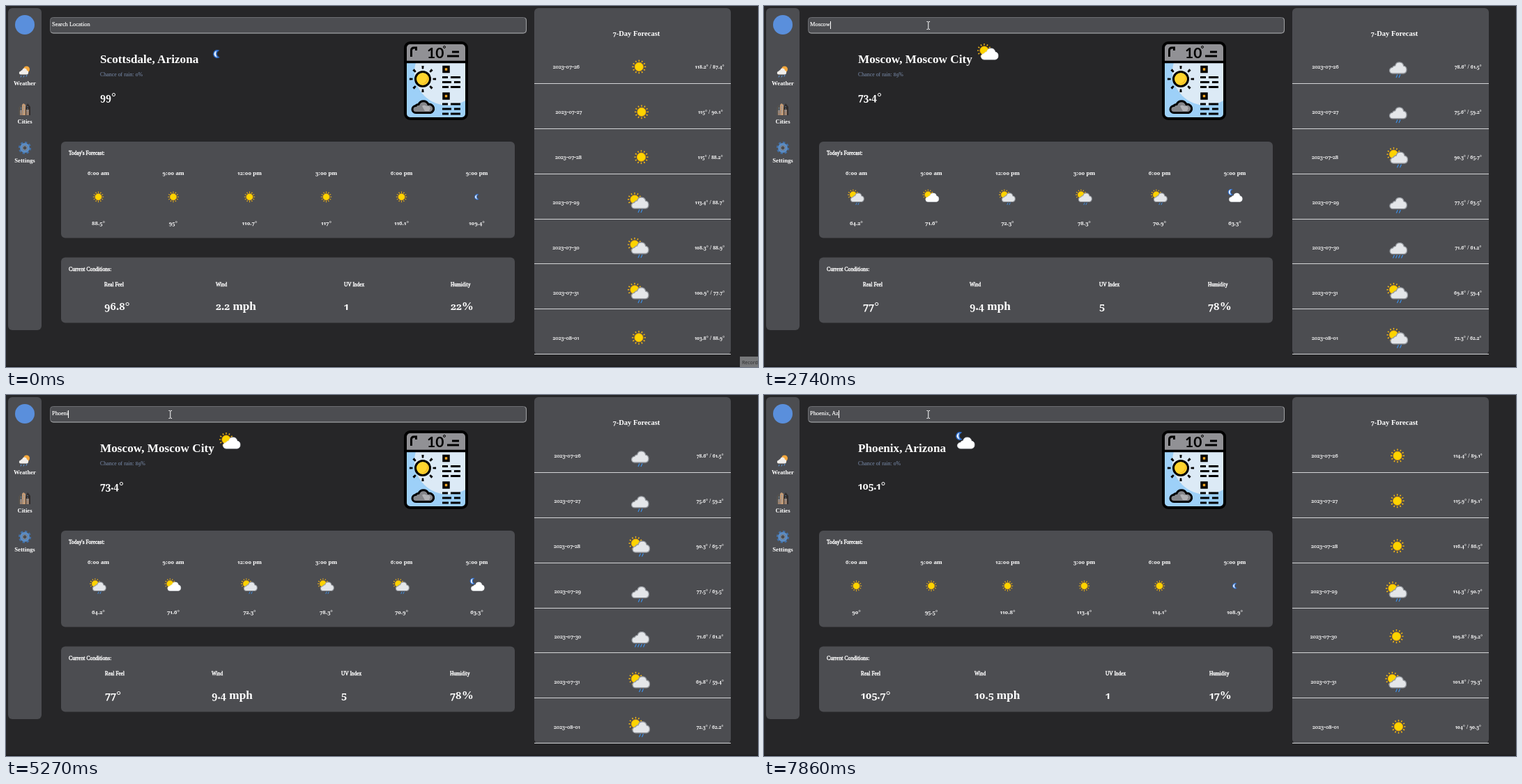
An HTML page that plays this animation: 1079 by 519 pixels, repeating every 8000 ms.

```html
<!DOCTYPE html>
<html lang="en">
<head>
<meta charset="utf-8">
<title>Weather dashboard</title>
<style>
html, body { margin: 0; width: 100%; height: 100%; overflow: hidden; background: #262628; }
svg { position: absolute; left: 0; top: 0; }
svg, #field { font-family: "Liberation Serif", "Noto Serif", serif; fill: #fff; color: #fff; }
.d { font-family: "Noto Serif", "Liberation Serif", serif; font-size: .86em; font-feature-settings: "onum", "pnum"; }
.l { stroke: #fff; stroke-width: .15px; }
.m { stroke: #fff; stroke-width: .4px; }
.b { font-weight: bold; }
.c { text-anchor: middle; }
#field { position: absolute; left: 66px; top: 20px; height: 14px; font-size: 8.4px; line-height: 14px; white-space: pre; -webkit-text-stroke: .15px #fff; }
#caret { position: absolute; top: 2px; width: 1px; height: 11px; background: #fff; }
</style>
</head>
<body>
<svg id="stage" width="1079" height="519" viewBox="0 0 1079 519">
  <defs>
    <g id="sun">
      <circle r="6.1" fill="#fdd400" stroke="#f2a500" stroke-width=".9"/>
      <circle r="8.8" fill="none" stroke="#f9b912" stroke-width="2.3" pathLength="12" stroke-dasharray=".32 .68" stroke-dashoffset=".16"/>
    </g>
    <path id="moon" d="M2.5-5A5.2 5.2 0 1 0 3 4.8A5.6 5.6 0 0 1 2.5-5Z" fill="#eef4fd" stroke="#2f70cf" stroke-width="1.5"/>
    <path id="puff" d="M-6 9a4.3 4.3 0 0 1-.3-8.600a4.500 4.500 0 0 1 4-2.600a6.100 6.100 0 0 1 12 .3a5 5.500 0 0 1 0 10.900z"/>
    <g id="gray"><use href="#puff" fill="#e4e6e9" stroke="#94989e" stroke-width="1.300"/></g>
    <g id="white"><use href="#puff" fill="#fff" stroke="#e4e8ee" stroke-width=".8"/></g>
    <path id="drops" d="M1 10.5l-2 4.5M5 10.5l-2 4.5" fill="none" stroke="#3d8fe6" stroke-width="1.2"/>
    <g id="fair"><use href="#sun" x="-6" y="-4"/><use href="#white"/></g>
    <g id="shower"><use href="#sun" x="-6" y="-4"/><use href="#gray"/><use href="#drops"/></g>
    <g id="rain"><use href="#gray" x="-2" y=".6"/><use href="#drops" x="-2" y=".6"/></g>
    <g id="heavy"><use href="#gray" x="-2" y=".6"/><use href="#drops" x="-7" y=".6"/><use href="#drops" x="1" y=".6"/></g>
    <g id="night"><use href="#moon" x="-8" y="-9"/><use href="#white"/></g>
    <clipPath id="page"><rect x="573" y="53" width="88" height="109" rx="7"/></clipPath>
  </defs>

  <rect y="517.6" width="1079" height="1.4" fill="#1b1b1d"/>
  <g fill="#4c4d51">
    <rect x="3" y="3" width="48" height="463" rx="6"/>
    <rect x="79" y="195" width="651" height="138.500" rx="6"/>
    <rect x="79" y="361.500" width="651" height="94" rx="6"/>
    <rect x="758" y="3" width="282" height="498" rx="6"/>
    <rect x="63.500" y="16.500" width="683" height="22.500" rx="4" stroke="#6d6e72"/>
  </g>
  <path d="M64.500 37.500q1.500 1.500 3.500 1.500H742.500q4 0 4-4V21q0-3-2-4" fill="none" stroke="#a2a3a6"/>

  <circle cx="27" cy="27" r="14" fill="#5a8fdc"/>
  <g>
    <circle cx="29.500" cy="91" r="4.500" fill="#f5a83c"/>
    <use href="#puff" transform="translate(24.500 93.500) scale(.55)" fill="#f1eeea"/>
    <path d="M22 100l-1 2.500M26 100l-1 2.500M30 99l-1 2.500" stroke="#5c9be0"/>
  </g>
  <g id="cities">
    <path d="M18 157v-11l3-4 3 4v11z" fill="#54524f"/>
    <path d="M23 157v-15l2-2 3 2v15z" fill="#c39a75"/>
    <path d="M28 157v-10l3-7 4 5v12z" fill="#312c2b"/>
    <path d="M20 157v-7h4v7zM29 157v-8h4v8z" fill="#9b8270"/>
    <path d="M25.500 144v10M31 144v9M21.500 146v7" stroke="#6f94b8" stroke-dasharray="1.5 1.5"/>
  </g>
  <g fill="none">
    <circle cx="27" cy="204" r="7.600" stroke="#426fa5" stroke-width="3" pathLength="8" stroke-dasharray=".55 .45"/>
    <circle cx="27" cy="204" r="5.300" stroke="#5b8cc4" stroke-width="3.200"/>
    <circle cx="27" cy="204" r="3.200" stroke="#9fb5cf" stroke-width=".8"/>
  </g>

  <g id="calendar">
    <g clip-path="url(#page)">
      <rect x="572" y="52" width="90" height="111" fill="#9dd0f8"/>
      <circle cx="634" cy="95" r="48" fill="#dceaf6"/>
      <rect x="572" y="52" width="90" height="28" fill="#919195"/>
    </g>
    <path d="M573 80.500H661" stroke="#000" stroke-width="3.500"/>
    <rect x="573" y="53" width="88" height="109" rx="7" fill="none" stroke="#000" stroke-width="4"/>
    <path d="M581.500 73V64q0-4 4-4h3v4M633 72h17M640 66h10" fill="none" stroke="#000" stroke-width="3"/>
    <text x="604" y="75" font-size="21" style="font-family:Lato,'Open Sans',sans-serif" font-weight="bold" fill="#000">10</text>
    <circle cx="629" cy="59" r="1.500" fill="none" stroke="#000"/>
    <circle cx="598" cy="105" r="10.500" fill="#ffd52e" stroke="#000" stroke-width="3"/>
    <path d="M603 98a8.500 8.500 0 0 1-8 14a9 9 0 0 0 8-14z" fill="#f5a623"/>
    <circle cx="598" cy="105" r="16.800" fill="none" stroke="#000" stroke-width="4.600" pathLength="8" stroke-dasharray=".22 .78" stroke-dashoffset=".11"/>
    <path d="M588 153.500a5 5 0 0 1 0-10q1-2 4-2a7.500 7.500 0 0 1 14 0a6 6 0 0 1 3 12z" fill="#85868a" stroke="#000" stroke-width="3"/>
    <path d="M597 144a4 4 0 0 1 6 0a5 5 0 0 1 6 3l-2 4h-6z" fill="#b0b1b5"/>
    <g id="lines"><path d="M628 87.500h7v7h-7z" fill="#f5a623" stroke="#000" stroke-width="3.500"/>
    <path d="M626 102.500h8M638 102.500h14M626 109.500h13M643 109.500h9M626 116.500h9M638 116.500h14" stroke="#000" stroke-width="3"/></g>
    <use href="#lines" y="38.500"/>
  </g>

  <g id="labels"></g>
  <g id="data"></g>
  <g id="record">
    <rect x="1053" y="504" width="26" height="15" fill="#77787a"/>
    <text x="1056" y="515" font-size="7" style="font-family:'Open Sans',sans-serif" fill="#2b2b2c">Record</text>
  </g>
  <path id="arrow" d="M0 0v10l2.500-2.300 1.600 3.600 1.500-.7-1.600-3.500h3.200z" stroke="#111" stroke-width=".6"/>
  <g id="beam" fill="none">
    <path id="bar" d="M233.500 22.500h1.500l.8 1 .8-1h1.500M235.800 23.500v9M233.500 33.500h1.500l.8-1 .8 1h1.500" stroke="#fff"/>
  </g>
</svg>
<div id="field"><span id="typed"></span><i id="caret"></i></div>

<script>
const $ = id => document.getElementById(id);
const LOOP = 8000;
const hourX = [132.5, 240, 349.5, 459.5, 567.5, 675.5];
const dates = ['07-26', '07-27', '07-28', '07-29', '07-30', '07-31', '08-01'];

const places = [
  { name: 'Scottsdale, Arizona', rain: 0, now: '99', end: 276, head: 'moon',
    temps: '88.5 95 110.7 117 116.1 109.4', sky: 'sun sun sun sun sun moon',
    cond: ['96.8°', '2.2 mph', '1', '22%'], condX: [141, 301, 485, 638],
    week: '118.2/87.4 115/90.1 115/88.2 113.4/88.7 108.3/88.9 100.9/77.7 103.8/88.9',
    weekSky: 'sun sun sun shower shower shower sun', shift: [0.3, 4, 3.5, 0, 0, 0, 0] },
  { name: 'Moscow, Moscow City', rain: 89, now: '73.4', end: 296, head: 'fair',
    temps: '64.2 71.6 72.3 78.3 70.9 63.3', sky: 'shower fair shower shower shower night',
    cond: ['77°', '9.4 mph', '5', '78%'], condX: [142, 295, 481, 637],
    week: '78.6/61.5 75.6/59.2 90.3/65.7 77.5/63.5 71.6/61.2 69.8/59.4 72.3/62.2',
    weekSky: 'rain rain shower rain heavy shower shower', shift: [2, 2, 1.5, 2.3, 2.5, 1.5, 1.5] },
  { name: 'Phoenix, Arizona', rain: 0, now: '105.1', end: 262, head: 'night',
    temps: '90 95.5 110.8 113.4 114.1 108.9', sky: 'sun sun sun sun sun moon',
    cond: ['105.7°', '10.5 mph', '1', '17%'], condX: [139, 302, 490, 639],
    week: '114.4/89.1 115.9/89.1 116.4/86.5 114.3/90.7 109.8/89.2 101.8/79.3 104/90.3',
    weekSky: 'sun sun sun shower sun shower sun', shift: [1, 0.7, 0.7, 0, -0.5, -0.5, 2.5] }
];

// time, typed text, caret visible
const typing = [
  [0, '', 0], [690, '', 1], [1220, '', 0], [1420, 'M', 1], [1610, 'Mo', 1], [1810, 'Mos', 1],
  [2140, 'Mosc', 1], [2270, 'Mosco', 1], [2340, 'Moscow', 1], [3000, 'Moscow', 0], [3530, 'Moscow', 1],
  [3990, 'Mosc', 1], [4060, 'M', 1], [4130, '', 0], [4590, '', 1], [4660, 'P', 1],
  [4860, 'Ph', 1], [4930, 'Pho', 1], [5070, 'Phoe', 1], [5200, 'Phoen', 1], [5270, 'Phoeni', 1],
  [5320, 'Phoenix', 1], [5850, 'Phoenix', 0], [5920, 'Phoenix,', 1], [6070, 'Phoenix, ', 1],
  [6470, 'Phoenix, A', 1], [6800, 'Phoenix, Az', 1], [7330, 'Phoenix, Az', 0], [7730, 'Phoenix, Az', 1]
];
// time, place shown by the text, place shown by the icons
const views = [[0, 0, 0], [2470, 1, 0], [2740, 1, 1], [7730, 2, 1], [7860, 2, 2]];
const moves = [[0, 0], [70, 1], [140, 2], [210, 3], [270, 4], [340, 5], [400, 6], [470, 7], [550, 8]];

const at = (table, t) => table.filter(row => row[0] <= t).pop();

function text(x, y, size, cls, str, fill = '#fff') {
  const body = str.replace(/\d+/g, '<tspan class="d">$&</tspan>');
  return `<text x="${x}" y="${y}" font-size="${size}" class="${cls}" fill="${fill}">${body}</text>`;
}
const icon = (id, x, y, k = 1) => `<use href="#${id}" transform="translate(${x} ${y}) scale(${k})"/>`;

function drawLabels() {
  let out = text(27, 113.5, 8.7, 'b c', 'Weather') + text(27, 168.5, 8.7, 'b c', 'Cities') +
    text(27, 224.5, 8.7, 'b c', 'Settings') + text(90, 214, 7.4, 'm', "Today's Forecast:") +
    text(90, 380.5, 7.7, 'm', 'Current Conditions:') + text(904.5, 43, 10.5, 'b c', '7-Day Forecast');
  ['6:00 am', '9:00 am', '12:00 pm', '3:00 pm', '6:00 pm', '9:00 pm'].forEach((h, i) => {
    out += text(hourX[i], 242.5, 9.1, 'b c', h);
  });
  dates.forEach((_, i) => {
    out += `<path d="M758 ${111.5 + Math.round(64.85 * i)}h282" stroke="#d4d5d7"/>`;
  });
  $('labels').innerHTML = out;
}

function drawData(p, q) {
  let out = text(135, 81.5, 17.2, 'b', p.name) +
    text(135, 101, 7.9, '', `Chance of rain: ${p.rain}%`, '#7c8fb0') +
    text(135, 136, 16.4, 'b', p.now + '°') + icon(q.head, p.end + 26, q.head === 'moon' ? 69 : 68);
  const sky = q.sky.split(' ');
  p.temps.split(' ').forEach((v, i) => {
    out += text(hourX[i], 314.5, 9.1, 'b c', v + '°') + icon(sky[i], hourX[i], 274.5, sky[i] === 'moon' ? 0.7 : 0.77);
  });
  ['Real Feel', 'Wind', 'UV Index', 'Humidity'].forEach((label, i) => {
    out += text(p.condX[i], 403, 7.4, 'm', label) + text(p.condX[i], 437, 17.2, 'b', p.cond[i]);
  });
  const weekSky = q.weekSky.split(' ');
  p.week.split(' ').forEach((v, i) => {
    const y = 87.4 + 64.9 * i, s = p.shift[i];
    out += text(803.5 + s, y + 3, 8.9, 'l c', '2023-' + dates[i]) + icon(weekSky[i], 908 + s, y) +
      text(1009.6 + 0.3 * s, y + 3, 8, 'b c', v.replace('/', '° / ') + '°');
  });
  $('data').innerHTML = out;
}

let shown = null;
function draw(t) {
  const view = at(views, t);
  if (view !== shown) {
    shown = view;
    drawData(places[view[1]], places[view[2]]);
  }
  const [, word, caret] = at(typing, t);
  $('typed').textContent = word || 'Search Location';
  $('caret').style.left = (word ? $('typed').offsetWidth : 0) + 'px';
  $('caret').style.opacity = caret;

  const step = at(moves, t)[1], u = 1 - (1 - step / 8) ** 2;
  $('record').style.opacity = step ? 0 : 1;
  $('arrow').style.opacity = step > 0 && step < 8 ? 1 : 0;
  $('arrow').setAttribute('transform', `translate(${1066 - 830 * u} ${510 - 482 * u})`);
  $('beam').style.opacity = step === 8 ? 1 : 0;
}

drawLabels();
const start = performance.now();
function tick() {
  draw((performance.now() - start) % LOOP);
  requestAnimationFrame(tick);
}
tick();
</script>
</body>
</html>
```
